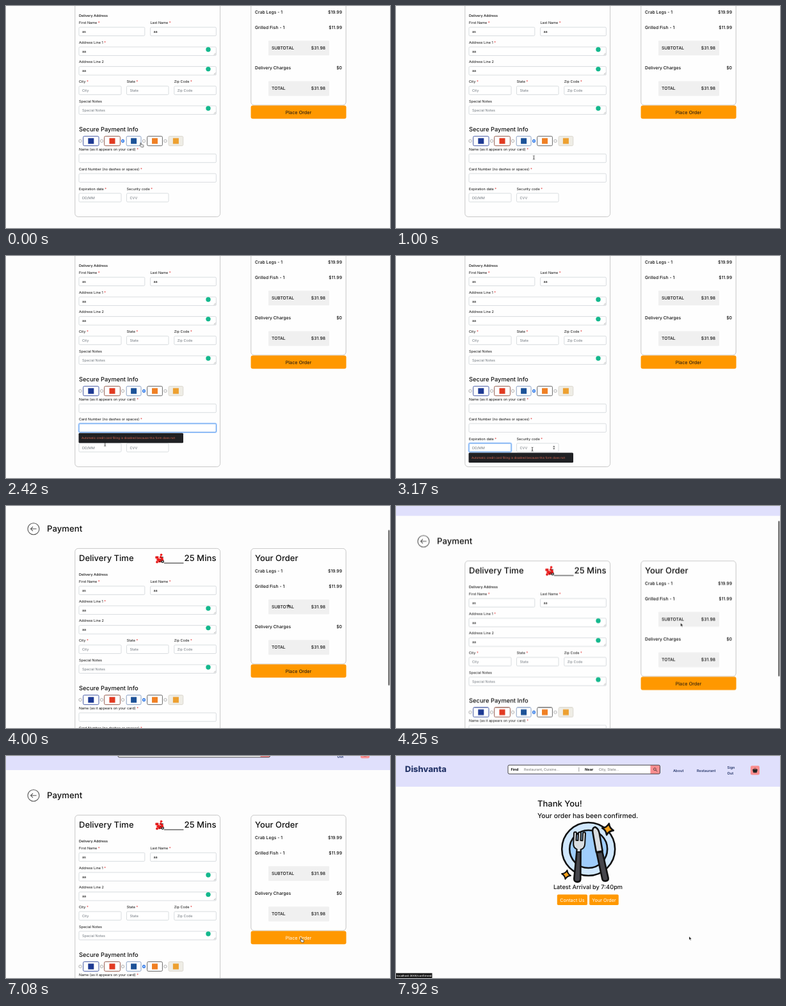
These frames come from a looping animation (600x347 px, 8000 ms). An HTML page:

```html
<!DOCTYPE html>
<html lang="en">
<head>
<meta charset="utf-8">
<title>Checkout</title>
<style>
html, body { margin: 0; width: 100%; height: 100%; overflow: hidden; background: #fdfdfd; }
svg { display: block; width: 100%; height: 100%; }
text { font-family: Inter, "Open Sans", sans-serif; white-space: pre; text-rendering: geometricPrecision; }

.toggle { animation: 8s step-end infinite; }
.scroll { animation: scroll 8s ease-in-out infinite; }
.thumb { animation: thumb 8s ease-in-out infinite, thumb-fade 8s linear infinite; }
.pointer { animation: pointer 8s ease-in-out infinite; }
.checkout { animation-name: checkout; }
.confirmed { animation-name: confirmed; }
.radio-on { animation-name: radio; }
.focus-name { animation-name: focus-name; }
.focus-card { animation-name: focus-card; }
.focus-expiry { animation-name: focus-expiry; }
.spin-card { animation-name: spin-card; }
.spin-cvv { animation-name: spin-cvv; }
.order-label { animation-name: order-label; }
.status { animation-name: status; }
.ghost { animation-name: ghost; }
.hand { animation-name: hand; }
.beam { animation-name: beam; }
.arrow { animation-name: arrow; }

@keyframes scroll {
  0%, 43% { transform: translateY(-144px); }
  49.4%, 50.6% { transform: translateY(-52px); }
  54.5%, 100% { transform: translateY(-26px); }
}
@keyframes thumb {
  0%, 43% { transform: translateY(102px); }
  49.4%, 50.6% { transform: translateY(37.5px); }
  54.5%, 100% { transform: translateY(18.5px); }
}
@keyframes thumb-fade {
  0%, 42.6% { opacity: 0; }
  42.8%, 58% { opacity: 1; }
  61%, 100% { opacity: 0; }
}
@keyframes pointer {
  0%, 1% { transform: translate(209.5px, 213.5px); }
  5.5%, 10.5% { transform: translate(231px, 211px); }
  13%, 15.5% { transform: translate(214px, 239px); }
  21%, 26% { transform: translate(177.5px, 271px); }
  31.5%, 33.5% { transform: translate(152px, 297px); }
  38.5%, 42.5% { transform: translate(213px, 302px); }
  49%, 51% { transform: translate(440.5px, 153px); }
  57.5%, 63% { transform: translate(459px, 285px); }
  66%, 72% { transform: translate(297.7px, 186px); }
  82.5%, 95.8% { transform: translate(460px, 284.2px); }
  97%, 100% { transform: translate(458px, 282px); }
}
@keyframes checkout { 0% { opacity: 1; } 95.85%, 100% { opacity: 0; } }
@keyframes confirmed { 0% { opacity: 0; } 95.85%, 100% { opacity: 1; } }
@keyframes radio { 0% { transform: none; } 6.25%, 100% { transform: translateX(33px); } }
@keyframes focus-name { 0% { opacity: 0; } 14.6% { opacity: 1; } 26%, 100% { opacity: 0; } }
@keyframes focus-card { 0% { opacity: 0; } 26% { opacity: 1; } 32.3%, 100% { opacity: 0; } }
@keyframes focus-expiry { 0% { opacity: 0; } 32.3% { opacity: 1; } 42.7%, 100% { opacity: 0; } }
@keyframes spin-card { 0% { opacity: 0; } 19.8% { opacity: 1; } 29%, 100% { opacity: 0; } }
@keyframes spin-cvv { 0% { opacity: 0; } 36.5% { opacity: 1; } 42.7%, 100% { opacity: 0; } }
@keyframes order-label { 0% { fill: #111; } 57%, 100% { fill: #fff; } }
@keyframes status { 0% { opacity: 0; } 59% { opacity: 1; } 75% { opacity: 0; } 89.5%, 100% { opacity: 1; } }
@keyframes ghost { 0% { opacity: 0; } 63.5% { opacity: 1; } 69%, 100% { opacity: 0; } }
@keyframes hand { 0% { opacity: 1; } 12% { opacity: 0; } 56.5% { opacity: 1; } 95.85%, 100% { opacity: 0; } }
@keyframes beam { 0% { opacity: 0; } 12% { opacity: 1; } 42.7%, 100% { opacity: 0; } }
@keyframes arrow { 0% { opacity: 0; } 42.7% { opacity: 1; } 56.5% { opacity: 0; } 95.85%, 100% { opacity: 1; } }
</style>
</head>
<body>
<svg id="stage" viewBox="0 0 600 347" preserveAspectRatio="none"></svg>
<script>
const INK = '#111', NAVY = '#28386b', ORANGE = '#ff9800', PINK = '#f98e90';
const END = 'text-anchor="end"', MID = 'text-anchor="middle"', MEDIUM = 'font-weight="500"';

const text = (x, y, size, value, attrs = '') =>
  `<text x="${x}" y="${y}" font-size="${size}" fill="${INK}" ${attrs}>${value}</text>`;
const heading = (x, y, size, value, attrs = '') => text(x, y, size, value, `${MEDIUM} ${attrs}`);
const rect = (x, y, w, h, fill, attrs = '') =>
  `<rect x="${x}" y="${y}" width="${w}" height="${h}" fill="${fill}" ${attrs}/>`;
const circle = (x, y, r, fill, attrs = '') =>
  `<circle cx="${x}" cy="${y}" r="${r}" fill="${fill}" ${attrs}/>`;
const path = (d, attrs) => `<path d="${d}" ${attrs}/>`;
const toggle = (name, content) => `<g class="toggle ${name}">${content}</g>`;

const label = (x, y, value, required = true) =>
  text(x, y, 5.5, value + (required ? '<tspan fill="#e02020"> *</tspan>' : ''));

function field(x, y, w, value = '', filled = false) {
  return rect(x, y, w, 13.4, '#fff', 'rx="1.5" stroke="#c9ced3" stroke-width=".7"') +
    text(x + 5, y + 8.8, 5.5, value, filled ? '' : 'style="fill:#70777e"');
}

function area(y, value, filled) {
  return field(114, y, 214.4, value, filled) +
    path(`M324.8 ${y + 12.5}l2.8-2.8M326.5 ${y + 12.5}l1.1-1.1`, 'stroke="#777" stroke-width=".5"') +
    circle(316, y + 4, 3.7, '#14b88d');
}

const plate = (x, w, border, mark, fill = '#fff') =>
  rect(x, 347.6, w, 14.8, fill, `rx="1.8" stroke="${border}" stroke-width=".9"`) +
  rect(x + w / 2 - 4.5, 350.5, 9, 9, mark);

const focus = (name, y, w) => toggle(name,
  rect(113.6, y - .4, w + .8, 14.2, 'none', 'rx="2" stroke="#c4dcff" stroke-width="2.2"') +
  rect(114, y, w, 13.4, 'none', 'rx="1.5" stroke="#62a2ee" stroke-width="1"') +
  rect(113.5, y + 14.8, 163.5, 15.4, '#202124', 'rx="1.5"') +
  text(118, y + 24, 4.65, 'Automatic credit card filling is disabled because this form does not', 'style="fill:#d9654f"'));

const spinner = (name, x, y) => toggle(name,
  rect(x - 2, y - 3.6, 4, 7.2, '#eee', 'rx="1"') +
  path(`M${x - 1.4} ${y - .9}l1.4-1.9 1.4 1.9zM${x - 1.4} ${y + .9}l1.4 1.9 1.4-1.9z`, 'fill="#333"'));

const orderLine = (y, name, price) =>
  heading(389, y, 6.85, name) + heading(525, y, 6.85, price, END);
const totalBox = (y, name) => rect(410, y, 95, 23, '#f0f0f0', 'rx="1"') +
  heading(415, y + 13.3, 6.75, name) + heading(499, y + 13.3, 6.85, '$31.98', END);
const card = (x, w, h) =>
  rect(x, 118.4, w, h, '#fefefe', 'rx="5" stroke="#b9b9b9" stroke-width=".8"');

function nav() {
  const link = (x, y, value) => text(x, y, 5.6, value, `font-weight="600" style="fill:${NAVY}"`);
  return rect(0, 0, 600, 48, '#e0e0fc') +
    text(14, 25.4, 13, 'Dishvanta', `font-weight="800" style="fill:${NAVY}"`) +
    rect(175, 14.2, 237.5, 13.8, '#fff', 'rx="2"') +
    path('M397.5 14.2h13q2 0 2 2v9.8q0 2-2 2h-13z', `fill="${PINK}"`) +
    rect(175, 14.2, 237.5, 13.8, 'none', 'rx="2" stroke="#333" stroke-width=".9"') +
    text(179.5, 23.1, 5.6, 'Find', 'font-weight="700"') +
    text(200, 23.1, 5.5, 'Restaurant, Cuisine...', 'style="fill:#747474"') +
    text(285, 23, 5.5, '|') +
    text(295, 23.1, 5.6, 'Near', 'font-weight="700"') +
    text(317, 23.1, 5.5, 'City, State...', 'style="fill:#747474"') +
    circle(404.4, 20.6, 1.9, 'none', 'stroke="#222" stroke-width=".7"') +
    path('M405.8 22l2.2 2.3', 'stroke="#222" stroke-width=".8"') +
    link(433, 24.5, 'About') + link(470, 24.5, 'Restaurant') +
    link(517.5, 20.2, 'Sign') + link(517.5, 28.9, 'Out') +
    rect(554, 15.2, 14, 14.2, PINK, 'rx="2.2"') +
    path('M557.5 21h7l-.8 4.2q-.1.6-.8.6h-3.8q-.7 0-.8-.6zM558.8 21.2l1.7-2.5M563.2 21.2l-1.7-2.5',
      'fill="#222" stroke="#222" stroke-width=".7"');
}

function scooter() {
  return path('M247 141.2h30.5', 'stroke="#222" stroke-width="1"') +
    circle(236, 139.6, 1.9, '#e21b1b') + circle(244.8, 138.8, 2.3, '#222') +
    circle(244.8, 138.8, .9, '#fff') +
    path('M235.5 134.6l4-.8 2.2 1.4 2.3-3.4 1.3.6 1 4.6-2.8.4-2.4 2.9h-2.5q-.6-2.8-3.4-3z', 'fill="#ef1c1c"') +
    rect(233.4, 130.6, 5, 3.6, '#e21b1b', 'rx=".6"') +
    path('M239.4 132.8l2-3.2 2.8 2.6-1.6 2.6z', 'fill="#d91818"') +
    circle(242.6, 128.2, 1.8, '#ef1c1c') +
    path('M243 131.6l3.2.6M241.2 135l1.8 2.6M239 138.4l4 1', 'stroke="#222" stroke-width=".9"');
}

function deliveryForm() {
  const radios = [116, 149.5, 182.5, 215.5, 249]
    .map(x => circle(x, 355, 2.2, '#fff', 'stroke="#777" stroke-width=".6"')).join('');
  return card(107.8, 226.8, 355) +
    heading(114, 138, 13, 'Delivery Time') + scooter() + heading(328.5, 138, 13.2, '25 Mins', END) +
    heading(114, 161.4, 5.5, 'Delivery Address') +
    label(114, 172, 'First Name') + field(114, 177.2, 102.8, 'as', true) +
    label(225.5, 172, 'Last Name') + field(225.5, 177.2, 102.9, 'aa', true) +
    label(114, 202.8, 'Address Line 1') + area(208, 'aa', true) +
    label(114, 233.4, 'Address Line 2', false) + area(238.6, 'aa', true) +
    label(114, 264, 'City') + field(114, 269.2, 66, 'City') +
    label(188.5, 264, 'State') + field(188.5, 269.2, 65.5, 'State') +
    label(262.8, 264, 'Zip Code') + field(262.8, 269.2, 65.6, 'Zip Code') +
    label(114, 294.8, 'Special Notes', false) + area(300, 'Special Notes', false) +
    heading(114, 340.3, 9.35, 'Secure Payment Info') + radios +
    toggle('radio-on', circle(182.5, 355, 2.5, '#2878f0') + circle(182.5, 355, 1, '#fff')) +
    plate(120.6, 24.4, '#344a9c', '#1e3a94') +
    plate(153.6, 24.8, '#8a4a3a', '#e23a22') +
    plate(188.2, 22.8, '#7994bd', '#1d5298') +
    plate(220.6, 23.8, '#555', '#f08024') +
    plate(254, 22.8, '#d8d5cc', '#eda030', '#efede6') +
    label(114, 370.2, 'Name (as it appears on your card)') + field(114, 375.3, 214.4) +
    label(114, 400.8, 'Card Number (no dashes or spaces)') + field(114, 406, 214.4) +
    label(114, 431.6, 'Expiration date') + field(114, 436.8, 66, 'DD/MM') +
    label(188.5, 431.6, 'Security code') + field(188.5, 436.8, 65.5, 'CVV') +
    focus('focus-name', 375.3, 214.4) +
    focus('focus-card', 406, 214.4) +
    focus('focus-expiry', 436.8, 66) +
    spinner('spin-card', 321, 412.6) + spinner('spin-cvv', 246.8, 443.5);
}

function orderSummary() {
  return card(382.8, 148.4, 180.6) +
    heading(389, 138, 13, 'Your Order') +
    orderLine(156.4, 'Crab Legs - 1', '$19.99') +
    orderLine(179.5, 'Grilled Fish - 1', '$11.99') +
    totalBox(198.2, 'SUBTOTAL') +
    orderLine(242.6, 'Delivery Charges', '$0') +
    totalBox(261.4, 'TOTAL') +
    rect(382.6, 299.5, 149, 20.8, ORANGE, 'rx="3"') +
    text(457, 312.8, 7.3, 'Place Order', `${MID} class="toggle order-label"`);
}

function checkoutPage() {
  const back = circle(43, 87.8, 9, 'none', 'stroke="#555" stroke-width="1.1"') +
    path('M47.6 87.8h-9m3.4-3.4L38.6 87.8l3.4 3.4', 'fill="none" stroke="#555" stroke-width="1.1"');
  return rect(0, 0, 600, 347, '#fdfdfd') +
    `<g class="scroll">${nav()}${back}${heading(64, 92.1, 13.2, 'Payment')}${deliveryForm()}${orderSummary()}</g>` +
    toggle('ghost', rect(417, 286.6, 54.5, 6.8, '#666', 'rx="2.5" opacity=".75"') +
      text(444.2, 291.5, 4.2, 'http://localhost:3000/conf...', `${MID} font-weight="700"`)) +
    rect(597, 0, 2.6, 243, '#777', 'rx="1.3" class="thumb"');
}

function plateAndCutlery() {
  const line = 'stroke="#111" stroke-width="2.6" stroke-linejoin="round"';
  const star = (x, y, scale) => path('M0-9Q2.2-2.2 9 0Q2.2 2.2 0 9Q-2.2 2.2-9 0Q-2.2-2.2 0-9Z',
    `transform="translate(${x} ${y}) rotate(12) scale(${scale})" fill="#f7a21b" ${line}`);
  const fork = path('M-3 27h6l2 44q0 5-5 5t-5-5z', `fill="#46464c" ${line}`) +
    path('M-9 0q0-2 2-2t2 2v11h3V0q0-2 2-2t2 2v11h3V0q0-2 2-2t2 2v16q0 7-6 9v4h-6v-4q-6-2-6-9z',
      `fill="#d9dde1" ${line} style="stroke-width:2"`);
  const knife = path('M-4.5 40h9l2 42q0 4-4.5 4t-5-4z', `fill="#46464c" ${line}`) +
    path('M-5 39V8q0-8 5-8 5 3 5 12v27z', `fill="#d9dde1" ${line}`);
  return circle(300.7, 145.5, 41.5, '#d0e7fd', line) +
    circle(300.7, 145.5, 29.5, '#9fcdfb', line) +
    `<g transform="translate(287 121) rotate(3)">${fork}</g>` +
    `<g transform="translate(311 111) rotate(-10)">${knife}</g>` +
    star(331, 114.5, 1) + star(266, 185.5, .78);
}

function confirmedPage() {
  const button = (x, w, value) => rect(x, 216.6, w, 16.4, ORANGE, 'rx="1.8"') +
    text(x + w / 2, 227.6, 7.3, value, `${MID} style="fill:#fff"`);
  return rect(0, 0, 600, 347, '#fdfdfd') + nav() +
    heading(221, 79.3, 13, 'Thank You!') +
    heading(221, 96.6, 10.4, 'Your order has been confirmed.') +
    plateAndCutlery() +
    heading(300, 207.6, 9.25, 'Latest Arrival by 7:40pm', MID) +
    button(251.8, 47.2, 'Contact Us') + button(302.2, 45.6, 'Your Order');
}

function pointer() {
  const hand = path('M.2.8Q.8-.2 1.5.8L2 2.9l2.6.6q1 .3.8 1.4L5 7H1.9L-.4 4.4q-.2-.9.8-.6L1 4z',
    'fill="#fff" stroke="#222" stroke-width=".7"');
  const beam = path('M-1.4-3Q0-3 0-2Q0-3 1.4-3M0-2v4M-1.4 3Q0 3 0 2Q0 3 1.4 3M-.7.9h1.4',
    'fill="none" stroke="#222" stroke-width=".7"');
  const arrow = path('M0 0v5.4l1.3-1.1.9 2 .9-.4-.9-2h1.7z',
    'fill="#111" stroke="#fff" stroke-width=".4"');
  return `<g class="pointer">${toggle('hand', hand)}${toggle('beam', beam)}${toggle('arrow', arrow)}</g>`;
}

document.getElementById('stage').innerHTML =
  toggle('checkout', checkoutPage()) +
  toggle('confirmed', confirmedPage()) +
  toggle('status', rect(0, 339.4, 56.5, 7.6, '#161616') +
    text(1.2, 344.9, 4.35, 'localhost:3000/confirmed', `${MEDIUM} style="fill:#fff"`)) +
  pointer();
</script>
</body>
</html>
```
